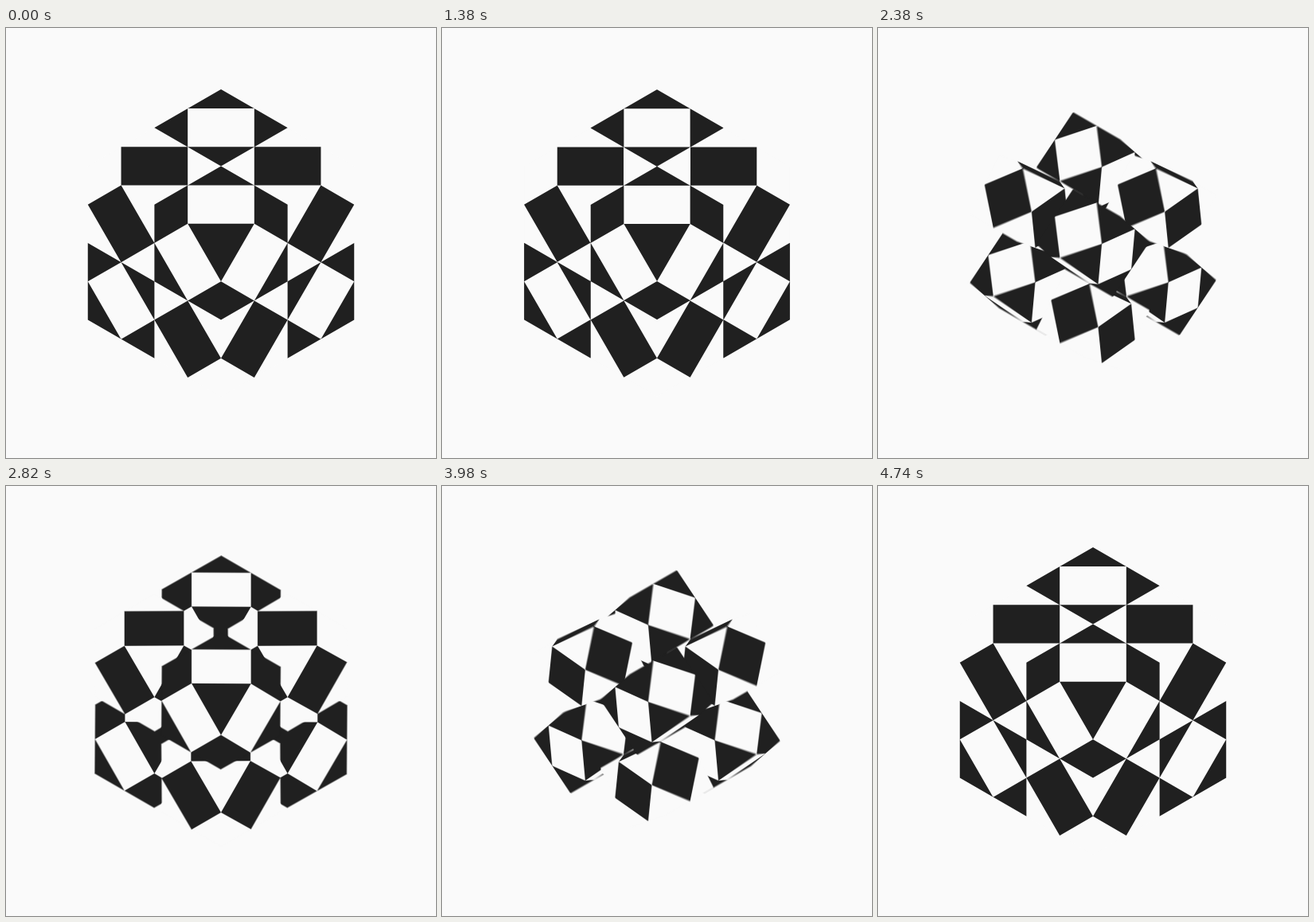
Animation of 540 by 540 pixels, one loop 4800 ms. Source, as an HTML page with a canvas:

```html
<!DOCTYPE html>
<html lang="en">
<head>
<meta charset="utf-8">
<title>Eight turning cubes</title>
<style>
  html, body { margin: 0; width: 100%; height: 100%; overflow: hidden; background: #fafafa; }
  canvas { display: block; }
</style>
</head>
<body>
<canvas id="stage" width="540" height="540"></canvas>
<script>
const SIZE = 540, EDGE = 96.55, TURN = 1600, STEP = 20;
const SHUTTER = 12, SAMPLES = 8;
const LIGHT = '#fafafa', DARK = '#202020';
// Each turn rotates the first axis towards the second.
const TURNS = [[0, 1], [2, 1], [2, 0]];

const stage = document.getElementById('stage').getContext('2d');
const layer = document.createElement('canvas');
layer.width = layer.height = SIZE;
const pen = layer.getContext('2d');

const ease = p => p < 0.5 ? 0.5 * (2 * p) ** 6 : 1 - 0.5 * (2 - 2 * p) ** 6;
const add = (a, b, k = 1) => a.map((v, i) => v + b[i] * k);
const scale = (a, k) => a.map(v => v * k);
const sum = a => a[0] + a[1] + a[2];
const project = ([x, y, z]) => [
  SIZE / 2 + EDGE * Math.sqrt(0.75) * (x - y),
  SIZE / 2 + EDGE * ((x + y) / 2 - z)
];

// Cube centres, ordered from back to front.
const cubes = [];
for (const x of [-0.5, 0.5])
  for (const y of [-0.5, 0.5])
    for (const z of [-0.5, 0.5]) cubes.push([x, y, z]);
cubes.sort((a, b) => sum(a) - sum(b));

function rotatedAxes([from, to], angle) {
  const axes = [[1, 0, 0], [0, 1, 0], [0, 0, 1]];
  const a = axes[from], b = axes[to], c = Math.cos(angle), s = Math.sin(angle);
  axes[from] = add(scale(a, c), b, s);
  axes[to] = add(scale(b, c), a, -s);
  return axes;
}

function fillFaces(faces, color) {
  pen.fillStyle = color;
  pen.beginPath();
  for (const face of faces) {
    face.forEach((p, i) => pen[i ? 'lineTo' : 'moveTo'](...project(p)));
    pen.closePath();
  }
  pen.fill();
}

function drawCube(centre, axes, size, faceColor, diamondColor) {
  const squares = [], diamonds = [];
  axes.forEach((axis, i) => {
    const side = sum(axis) < 0 ? -1 : 1;
    const middle = add(centre, axis, side * size / 2);
    const u = scale(axes[(i + 1) % 3], size / 2);
    const v = scale(axes[(i + 2) % 3], side * size / 2);
    const at = ([a, b]) => add(add(middle, u, a), v, b);
    squares.push([[-1, -1], [1, -1], [1, 1], [-1, 1]].map(at));
    diamonds.push([[0, -1], [1, 0], [0, 1], [-1, 0]].map(at));
  });
  fillFaces(squares, faceColor);
  fillFaces(diamonds, diamondColor);
}

function drawScene(time) {
  const t = (time + 3 * TURN) % (3 * TURN);
  const turn = TURNS[Math.floor(t / TURN)];
  const p = (t % TURN) / TURN;
  const angle = ease(p) * Math.PI / 2;
  // Shrink just enough for neighbours to turn freely, then grow back.
  const size = 1 - (1 - Math.SQRT1_2) * ease(1 - Math.abs(2 * p - 1));
  pen.fillStyle = LIGHT;
  pen.fillRect(0, 0, SIZE, SIZE);
  for (const centre of cubes) {
    const even = centre[0] * centre[1] * centre[2] > 0 === sum(centre) > -1
      && centre[0] * centre[1] * centre[2] > 0;
    const axes = rotatedAxes(turn, even ? angle : -angle);
    drawCube(centre, axes, size, even ? DARK : LIGHT, even ? LIGHT : DARK);
  }
}

function frame() {
  const time = Math.floor(performance.now() / STEP) * STEP % (3 * TURN);
  for (let i = 0; i < SAMPLES; i++) {
    drawScene(time + SHUTTER * ((i + 0.5) / SAMPLES - 0.5));
    stage.globalAlpha = 1 / (i + 1);
    stage.drawImage(layer, 0, 0);
  }
  requestAnimationFrame(frame);
}
frame();
</script>
</body>
</html>
```
